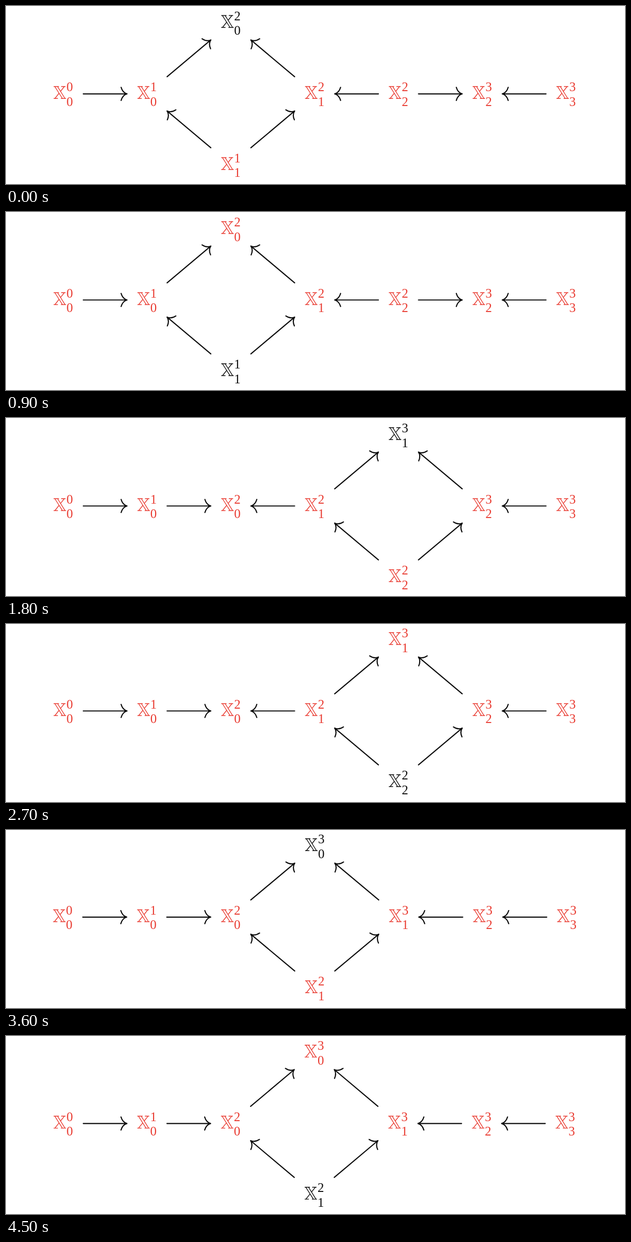
Write an HTML page that moves like this. It is 1200 px wide and 347 px high and loops after 5400 ms.

```html
<!DOCTYPE html>
<html lang="en">
<head>
<meta charset="utf-8">
<title>Zigzag diamonds</title>
<style>
  html, body { margin: 0; width: 100%; height: 100%; overflow: hidden; background: #fff; }
  svg { display: block; width: 100%; height: 100%; }
  text { font: 25px "Liberation Serif", "Times New Roman", serif; text-anchor: middle; }
  .letter { fill: none; stroke: currentColor; stroke-width: 1.4; }
  .arrow { fill: none; stroke: #0c0c0c; stroke-width: 2.2; stroke-linecap: round; stroke-linejoin: round; }
</style>
</head>
<body>
<svg id="stage" viewBox="0 0 1200 347"></svg>
<script>
const stage = document.getElementById("stage");
const HOLD = 900;
const RED = "#e93a30", BLACK = "#0c0c0c";
const ROW_GAP = 138.5, PAD_X = 38.8, PAD_Y = 33.4;

// Each pair is a lower and an upper index; `swap` is the column of the diamond.
const low = { chain: "00 01 11 12 22 23 33", swap: 2 };
const mid = { chain: "00 01 02 12 22 23 33", swap: 4 };
const high = { chain: "00 01 02 12 13 23 33", swap: 3 };
const scenes = [
  { ...low, black: "top", x: 111, pitch: 162.45, y: 171.3 },
  { ...low, black: "bottom", x: 111, pitch: 162.45, y: 171.5 },
  { ...mid, black: "top", x: 111, pitch: 162.45, y: 171.5 },
  { ...mid, black: "bottom", x: 111, pitch: 162.45, y: 169.5 },
  { ...high, black: "top", x: 110, pitch: 162.85, y: 169.8 },
  { ...high, black: "bottom", x: 111, pitch: 162.2, y: 170.6 }
];

// Double-struck serif X, centred on the math axis.
const LETTER = "M-18.6 -14.3H-8.4M-4 -14.3H4.4M-18.6 9H-10.4M-4.6 9H5.4" +
  "M-16.2 -14L-1.8 8.7M-10.9 -14L3.2 8.7M1.9 -14L-5.5 -4.6M-8.3 -1L-16 8.7";

function node({ x, y, label, color }) {
  return `<g transform="translate(${x} ${y})" color="${color}" fill="${color}">
    <path class="letter" d="${LETTER}"/>
    <text x="12.6" y="-5">${label[1]}</text>
    <text x="12.6" y="23.5">${label[0]}</text></g>`;
}

function arrow(from, to) {
  const sx = Math.sign(to.x - from.x), sy = Math.sign(to.y - from.y);
  const x1 = from.x + sx * PAD_X, y1 = from.y + sy * PAD_Y;
  const dx = to.x - sx * PAD_X - x1, dy = to.y - sy * PAD_Y - y1;
  const length = Math.hypot(dx, dy), angle = Math.atan2(dy, dx) * 180 / Math.PI;
  return `<path class="arrow" transform="translate(${x1} ${y1}) rotate(${angle}) translate(${length})"
    d="M${-length} 0H0M-11.5 -12.8C-9.4 -5.4 -4.5 -1.3 0 0C-4.5 1.3 -9.4 5.4 -11.5 12.8"/>`;
}

function render({ chain, swap, black, x, pitch, y }) {
  const nodes = chain.split(" ").map((label, i) =>
    ({ label, x: x + i * pitch, y, color: RED }));
  const left = nodes[swap - 1], right = nodes[swap + 1], bottom = nodes[swap];
  const top = { ...bottom, label: left.label[0] + right.label[1], y: y - ROW_GAP };
  bottom.y += ROW_GAP;
  (black === "top" ? top : bottom).color = BLACK;

  const arrows = [arrow(left, top), arrow(right, top)];
  nodes.slice(1).forEach((b, i) => {
    const a = nodes[i];
    const grows = b === bottom || a === bottom ? b !== bottom : b.label[1] > a.label[1];
    arrows.push(grows ? arrow(a, b) : arrow(b, a));
  });
  stage.innerHTML = arrows.join("") + [...nodes, top].map(node).join("");
}

let shown = -1;
const start = performance.now();
function tick() {
  const index = Math.floor((performance.now() - start) / HOLD) % scenes.length;
  if (index !== shown) render(scenes[shown = index]);
  requestAnimationFrame(tick);
}
tick();
</script>
</body>
</html>
```
